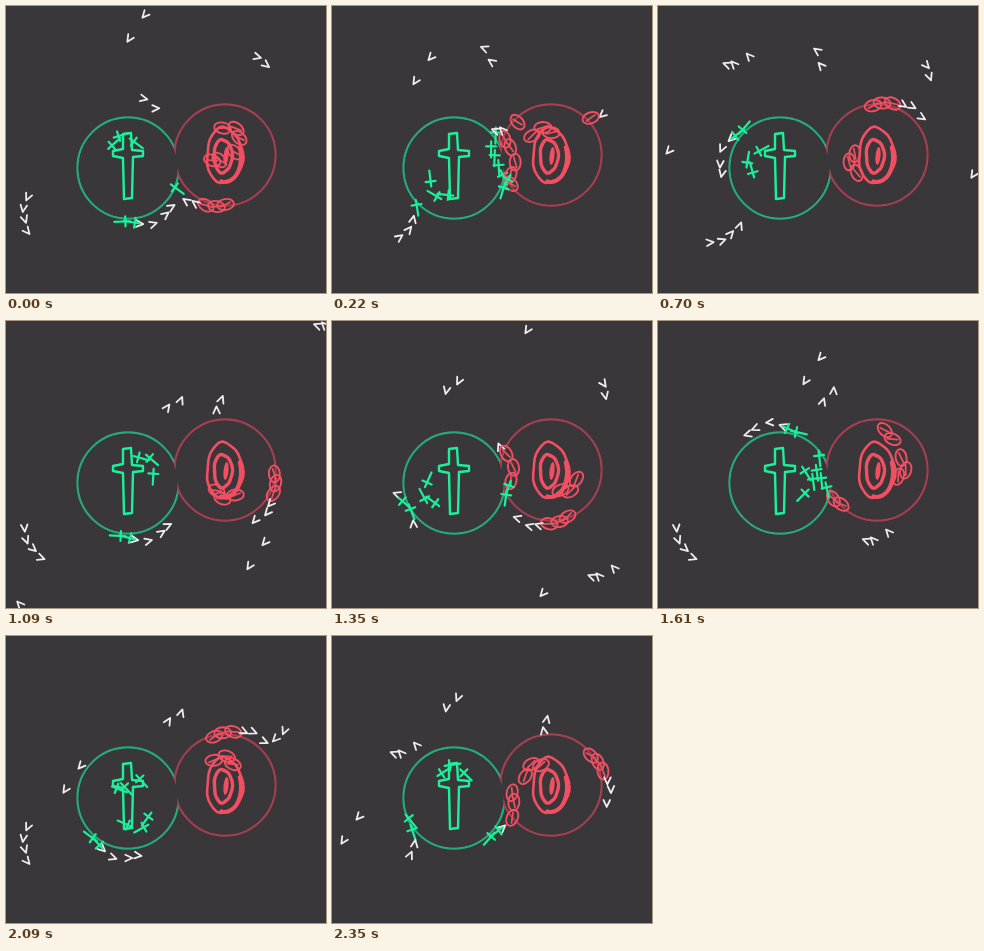
An HTML page with a canvas for the animation above (2400 ms loop, 320 px wide and 287 px high).

```html
<!DOCTYPE html>
<html lang="en">
<head>
<meta charset="utf-8">
<title>Flock</title>
<style>
  html, body { margin: 0; width: 100%; height: 100%; overflow: hidden; background: #393739; }
  canvas { display: block; }
</style>
</head>
<body>
<canvas id="stage" width="320" height="287"></canvas>
<script>
const W = 320, H = 287, LOOP = 2400, STEP = 43.6, LAST = 54;
const BACK = '#393739', WHITE = '#efedef', GREEN = '#1cf09a', RED = '#f34f63';
const RAD = Math.PI / 180, TAU = 2 * Math.PI, RING = 50.5;
const ctx = document.getElementById('stage').getContext('2d');
ctx.lineCap = ctx.lineJoin = 'round';

const left = { x: 122, y: 162, color: '#26a97b', glyph: dagger };
const right = { x: 219, y: 149, color: '#a33f50', glyph: pill };
const zones = [left, right];

let seed = 7;
function random() {
  seed = (seed * 16807) % 2147483647;
  return seed / 2147483647;
}
const spread = size => (random() - 0.5) * size;

// Circling flocks: start and turn (per step) in degrees
function orbit(count, center, radius, start, turn) {
  return Array.from({ length: count }, (_, i) => {
    const r = radius + spread(13);
    const a0 = start + ((i - (count - 1) / 2) * 11 + spread(6)) / radius / RAD;
    const tilt = spread(0.7);
    return step => {
      const a = (a0 + turn * step) * RAD;
      return {
        x: center.x + r * Math.cos(a),
        y: center.y + r * Math.sin(a),
        heading: a + Math.sign(turn) * Math.PI / 2 + tilt
      };
    };
  });
}

// Flocks that cross the stage and come back on the far side
const wrap = (v, size) => ((v % size) + size) % size;
function drift(count, start, vx, vy) {
  return Array.from({ length: count }, () => {
    const x = start.x + spread(28), y = start.y + spread(28), tilt = spread(0.7);
    return step => ({
      x: wrap(x + vx * step, W),
      y: wrap(y + vy * step, H),
      heading: Math.atan2(vy, vx) + tilt
    });
  });
}

const birds = [
  ...orbit(6, right, 56, 115, 11),
  ...orbit(6, left, 56, 70, -14.2),
  ...orbit(3, right, 28, -70, -7.9),
  ...orbit(3, left, 28, 264, -26.5),
  ...orbit(4, { x: 50, y: 205 }, 35, 175, -30),
  ...orbit(2, { x: 245, y: 85 }, 30, -70, 24.5),
  ...orbit(2, { x: 145, y: 72 }, 25, 95, -31.5),
  ...drift(3, { x: 218, y: 157 }, -8.6, -6),
  ...drift(2, { x: 135, y: 19 }, -8, 8.5)
];

function stroke(color, width) {
  ctx.strokeStyle = color;
  ctx.lineWidth = width;
  ctx.stroke();
}

function line(color, width, ...pts) {
  ctx.beginPath();
  for (let i = 0; i < pts.length; i += 2) ctx.lineTo(pts[i], pts[i + 1]);
  stroke(color, width);
}

function oval(x, y, rx, ry, tilt = 0, from = 0, to = TAU) {
  ctx.beginPath();
  ctx.ellipse(x, y, rx, ry, tilt, from, to);
}

function chevron() {
  line(WHITE, 1.8, -3.5, -3.3, 3.5, 0, -3.5, 3.3);
}

function dagger() {
  line(GREEN, 2.2, -8, 0, 8, 0);
  line(GREEN, 2.2, 3, -5, 3, 5);
}

function pill() {
  oval(0, 0, 8.5, 5.5);
  stroke(RED, 1.9);
  line(RED, 1.7, -5, 1.5, 5, -1.5);
}

// Uneven closed outline, like a loose pen stroke
function scrawl(x, y, rx, ry, width, phase) {
  ctx.beginPath();
  for (let a = 0; a < 6.4; a += 0.2) {
    const k = 1 + 0.05 * Math.sin(a * 3 + phase) + 0.02 * Math.sin(a * 7 + phase);
    ctx.lineTo(x + rx * k * Math.cos(a), y + ry * k * Math.sin(a));
  }
  stroke(RED, width);
}

function eye() {
  scrawl(218.5, 149.5, 18, 27.5, 2.6, 1);
  oval(219, 151, 16, 25, 0, -0.4, 1.8);
  stroke(RED, 4);
  scrawl(217, 150, 9, 16.5, 3.4, 2);
  oval(220, 150, 2.5, 9, 0.1);
  ctx.fillStyle = RED;
  ctx.fill();
}

function cross() {
  line(GREEN, 2.4, 117, 128, 125, 127, 126, 144, 137, 145, 137, 150, 127, 151,
    126, 192, 118, 193, 117, 152, 107, 150, 107, 145, 117, 143, 117, 128);
}

// The rings join into one outline, open where they overlap
function rings() {
  for (const z of zones) {
    oval(z.x, z.y, RING, RING);
    stroke(z.color, 2.3);
  }
  ctx.fillStyle = BACK;
  for (const z of zones) {
    oval(z.x, z.y, RING - 1.1, RING - 1.1);
    ctx.fill();
  }
}

function drawBird({ x, y, heading }) {
  const zone = zones.find(z => Math.hypot(x - z.x, y - z.y) < RING + 4);
  ctx.save();
  ctx.translate(x, y);
  ctx.rotate(heading);
  (zone ? zone.glyph : chevron)();
  ctx.restore();
}

function frame() {
  const t = performance.now() % LOOP;
  const step = Math.min(LAST, Math.floor((t + 7) / STEP));
  ctx.fillStyle = BACK;
  ctx.fillRect(0, 0, W, H);
  rings();
  cross();
  eye();
  for (const bird of birds) drawBird(bird(step));
  requestAnimationFrame(frame);
}
frame();
</script>
</body>
</html>
```
